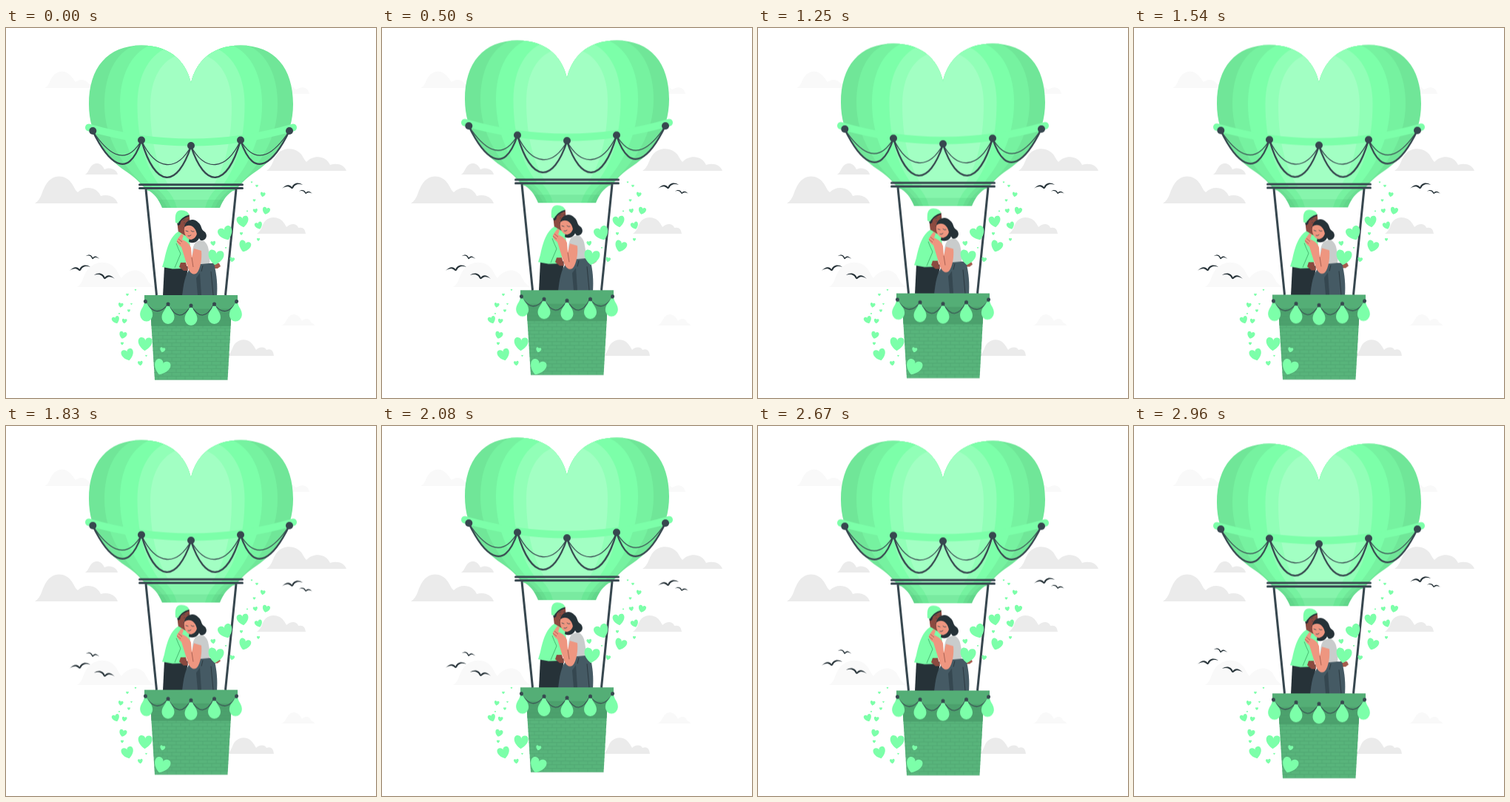
These frames come from a looping animation (500 by 500 pixels, 3 s). An HTML page without scripts:

```html
<!DOCTYPE html>
<html lang="en">
<head>
<meta charset="utf-8">
<title>Balloon ride</title>
<style>
  html, body { margin: 0; width: 100%; height: 100%; overflow: hidden; background: #fff; }
  svg { display: block; width: 100vw; height: 100vh; }
  .balloon { animation: bob 1.5s linear -33ms infinite; }
  .birds { animation: rise 3s infinite; fill: #263238; }
  @keyframes bob {
    0%, 100% { transform: translateY(.4px); }
    50% { transform: translateY(-9.6px); }
  }
  @keyframes rise {
    0% { transform: none; }
    50% { transform: none; animation-timing-function: ease-in; }
    100% { transform: translateY(-6.4px); }
  }
  .pale { fill: #f9f9f9; }
  .grey { fill: #ebebeb; }
  .main { fill: #7cffa9; }
  .ink { fill: #37474f; }
  .line { fill: none; stroke: #37474f; stroke-linecap: round; }
  .skin { fill: #ee9680; }
  .brown { fill: #8c4a40; }
  .night { fill: #263238; }
</style>
</head>
<body>
<svg viewBox="0 0 500 500">
  <defs>
    <path id="bird" d="M0 8C4 4 8 2 11.500 4.200C12.500 5 13 5.500 13.500 6C15 1.500 21-2 28 3C22 1 17.500 2.500 15.500 6.500C14.500 8.800 12.500 8.500 11.500 7C8 4 4 5.500 0 8Z"/>
    <path id="heart" d="M0 5C-6.600 1-6-4.700-2.800-4.700C-1-4.700 0-3.500 0-2.400C0-3.500 1-4.700 2.800-4.700C6-4.700 6.600 1 0 5Z"/>
    <g id="bulb">
      <path class="main" d="M-2.300-12.500H2.300C3-8 8.500-5 8.500 2.500A8.500 9 0 0 1-8.500 2.500C-8.500-5-3-8-2.300-12.500Z"/>
      <circle class="ink" cy="-15.500" r="2.500"/>
    </g>
    <path id="body" d="M250 75C245 50 226 23.500 183 23.500C137 23.500 112 54 112 103C112 147 136 176 161 193C171 200 179 206 184 213L192 220H308L316 213C321 206 329 200 339 193C364 176 388 147 388 103C388 54 363 23.500 317 23.500C274 23.500 255 50 250 75Z"/>
    <clipPath id="inBody"><use href="#body"/></clipPath>
    <path id="skirt" d="M190 218C201 224 206 231 211 243H289C294 231 299 224 310 218Z"/>
    <clipPath id="inSkirt"><use href="#skirt"/></clipPath>
    <pattern id="weave" width="12" height="10" patternUnits="userSpaceOnUse">
      <path d="M0 .5H12M0 5.500H12M2 .5V5.500M8 5.500V10" fill="none" stroke="#50a772" stroke-width=".8"/>
    </pattern>
    <g id="ropes" class="line">
      <path d="M117 139C137 180 164 209 183 152M183 152C202 217 231 217 250 160" stroke-width="2.300"/>
      <path d="M117 139C135 166 160 191 183 152M183 152C203 194 231 194 250 160" stroke-width="1.300"/>
      <path d="M189 218L203.500 361" stroke-width="3" stroke-linecap="butt"/>
      <path d="M188 369Q203 394 219 373Q234 402 250 375" stroke-width="1.100"/>
    </g>
  </defs>

  <g class="pale">
    <path d="M52 81C58 79 58 73 62 67C68 57 80 56 87 64C91 68 92 71 94 73C101 67 110 71 112 76C117 76 120 78 121 81Z"/>
    <path d="M370 89C377 87 377 80 384 79.500C389 79 390 83 393 83C400 78 408 80 410 89Z"/>
    <path d="M96 350C104 346 104 334 110 327C121 313 141 314 149 327C152 331 153 335 156 338C165 325 181 324 188 335C191 341 194 347 201 350Z"/>
    <path d="M372 402C379 400 379 391 385 388C392 385 397 390 400 396C405 391 411 393 412 398Q416 399 417 402Z"/>
  </g>
  <g class="grey">
    <path d="M39 237C48 232 48 220 55 210C64 197 80 198 88 209C92 214 93 219 97 222C107 212 123 215 128 227C138 224 148 228 151 237Z"/>
    <path d="M107 198C112 195 112 189 117 185C123 181 129 183 133 191C140 187 150 191 151 198Z"/>
    <path d="M352 193C360 188 360 179 366 171C375 160 392 161 400 172C402 176 404 179 406 181C416 170 433 173 438 185C448 182 457 185 460 193Z"/>
    <path d="M339 278C346 274 345 266 351 260C359 253 371 256 376 264L379 269C386 262 394 265 395 270Q404 268 405 278Z"/>
    <path d="M299 443C306 439 305 430 311 425C319 418 330 421 335 430L338 435C344 429 351 432 352 435Q361 432 362 443Z"/>
  </g>

  <g class="birds">
    <use href="#bird" x="86" y="320"/>
    <use href="#bird" transform="translate(147 331) scale(-1 1)"/>
    <use href="#bird" transform="translate(126 306) scale(-.65 .75)"/>
    <use href="#bird" x="373" y="209"/>
    <use href="#bird" transform="translate(414 218.500) scale(-.65 .68)"/>
  </g>

  <g class="balloon">
    <!-- Envelope -->
    <use href="#body" fill="#70e698"/>
    <g clip-path="url(#inBody)">
      <path fill="#76f2a0" d="M187 20C151 25 133 60 133 103C133 150 158 190 196 221H304C342 190 367 150 367 103C367 60 349 25 313 20Z"/>
      <path class="main" d="M204 20C171 28 154 62 154 103C154 152 175 191 203 221H297C325 191 346 152 346 103C346 62 329 28 296 20Z"/>
      <path fill="#91ffb7" d="M224 25C195 32 177.500 63 177.500 103C177.500 155 190 194 214 221H286C310 194 322.500 155 322.500 103C322.500 63 305 32 276 25Z"/>
      <path fill="#a2ffc3" d="M235 36C211 42 195 68 195 105C195 157 206 196 226 221H274C294 196 305 157 305 105C305 68 289 42 265 36Z"/>
    </g>
    <use href="#skirt" fill="#6ade92"/>
    <g clip-path="url(#inSkirt)">
      <path fill="#70e698" d="M197 218Q211 228 218 243H282Q289 228 303 218Z"/>
      <path fill="#76f2a0" d="M205 218Q217 228 223 243H277Q283 228 295 218Z"/>
      <path fill="#86f5ac" d="M217 218Q227 228 231 243H269Q273 228 283 218Z"/>
      <path d="M190 232H310V243H190Z" fill="#2ea85c" opacity=".15"/>
    </g>
    <path d="M112 134.500C155 147 200 154.500 250 154.500S345 147 388 134.500" fill="none" stroke="#7cffa9" stroke-width="10" stroke-linecap="round"/>

    <!-- Couple -->
    <path fill="#a55b4d" d="M279 316L288 318L290 322L286 325L279 325Z"/>
    <path class="night" d="M214 322L212 362H241L246 322Z"/>
    <path class="brown" d="M232 259C231 267 233 272 233 279L246 284L246 276C249 272 249 262 247.500 252L240 252Z"/>
    <path class="night" d="M231 262Q237 254 247 252L247.500 254.500Q240 257 236.500 261L235 266L232 267Z"/>
    <path class="main" d="M229 263C228 251 230 246.500 237 246.300C243 246.500 246.500 249 247.500 252.500C241 254 236 258 232.500 264Z"/>
    <path class="line" d="M239 260L242 259M245 259L247 259.500M241 263V264M246 263V264M240 270Q242 272 244 270" stroke-width=".8"/>
    <path class="main" d="M233 275C225 280 219 289 214 313L211 323L225 325.500L241 325L249 298L248 283Q240 280 233 275Z"/>
    <path class="brown" d="M236 317L243 317L246 328L240 328L234 323Z"/>
    <path d="M230 291Q233 299 236 305M236 305L228 324" fill="none" stroke="#39a763" stroke-width=".8"/>
    <path fill="#455a64" d="M262 318L281 318C285 334 286 348 285 362H238C240 345 242 334 248 326Z"/>
    <path d="M257 338L262 331L264 361H259Z" fill="#354750"/>
    <path d="M277 329L280 361M266 321L264 329" fill="none" stroke="#263238" stroke-width=".8"/>
    <path class="night" d="M242 268C243 260 253 255 260 263C265 267 263 272 268 275C273 279 271 286 266 287C263 288 262 286 261 284C259 289 253 292 247 289L249 276Z"/>
    <path class="skin" d="M241.500 268C247 264 255 265 258 271C260 278 256 285 250 286C244 286 239 277 241.500 268Z"/>
    <path class="night" d="M241 269C242 261 249 258 256 262C261 265 262 273 263 281L258 279C257 273 254 268 249 267Q245 266 241 269Z"/>
    <path class="line" d="M243 274L246 275M250 274Q252 276 254 275M246 281Q248 282 250 280" stroke-width=".8"/>
    <path fill="#c9cccc" d="M256 290C264 284 270 287 273 296C275 305 276 313 275 318L253 320C251 308 251 296 256 290Z"/>
    <path class="skin" d="M254 298L264 301C265 311 263 325 258 331C253 335 249 331 246 325L237 296C232 292 229 288 232 285L237 278L240 280L238 286C243 288 248 291 250 297L251 310Z"/>
    <path d="M231 288L236 292M233 285L238 289M251 310L253 323" fill="none" stroke="#8f4c42" stroke-width=".7"/>

    <!-- Basket -->
    <path fill="#58b47b" d="M195 379H305L299.500 475.500H201Z"/>
    <path fill="url(#weave)" d="M195 379H305L299.500 475.500H201Z"/>
    <path fill="#4b9e6b" opacity=".85" d="M195 379H305L303.500 403H196.500Z"/>
    <path fill="#54ae76" d="M187 361H313V379.500H187Z"/>

    <!-- Rigging -->
    <use href="#ropes"/>
    <use href="#ropes" transform="translate(500) scale(-1 1)"/>
    <path class="line" stroke-width="3" stroke-linecap="butt" d="M180.500 211.800H319.500M180.500 216.600H319.500"/>
    <g class="ink">
      <circle cx="117.300" cy="139" r="5"/>
      <circle cx="183" cy="151.500" r="5"/>
      <circle cx="250" cy="159" r="5"/>
      <circle cx="317" cy="151.500" r="5"/>
      <circle cx="383" cy="139" r="5"/>
    </g>
    <use href="#bulb" transform="translate(189.500 385) rotate(-4)"/>
    <use href="#bulb" x="219" y="388.500"/>
    <use href="#bulb" x="250" y="390.500"/>
    <use href="#bulb" x="281.500" y="388.500"/>
    <use href="#bulb" transform="translate(310.500 385) rotate(4)"/>
  </g>

  <g class="main">
    <use href="#heart" transform="translate(320 261.500) rotate(-8) scale(1.550)"/>
    <use href="#heart" transform="translate(322.500 295) rotate(18) scale(1.550)"/>
    <use href="#heart" transform="translate(297 277.500) rotate(-22) scale(1.900)"/>
    <use href="#heart" transform="translate(283.500 310) rotate(8) scale(2.050)"/>
    <use href="#heart" transform="translate(351.500 247) rotate(15) scale(1)"/>
    <use href="#heart" transform="translate(341.500 267) rotate(-20) scale(1)"/>
    <use href="#heart" transform="translate(337 247) rotate(-10) scale(.6)"/>
    <use href="#heart" transform="translate(347 225) rotate(12) scale(.65)"/>
    <use href="#heart" transform="translate(339 213.500) scale(.35)"/>
    <use href="#heart" transform="translate(332 208.500) scale(.25)"/>
    <use href="#heart" transform="translate(335.500 233) scale(.35)"/>
    <use href="#heart" transform="translate(326 247.500) scale(.22)"/>
    <use href="#heart" transform="translate(318 278) scale(.4)"/>
    <use href="#heart" transform="translate(341 286) scale(.4)"/>
    <use href="#heart" transform="translate(280 291) rotate(-10) scale(.65)"/>
    <use href="#heart" transform="translate(305.500 313) rotate(12) scale(.65)"/>
    <use href="#heart" transform="translate(297 297) scale(.22)"/>

    <use href="#heart" transform="translate(188 427) rotate(3) scale(1.850)"/>
    <use href="#heart" transform="translate(164.500 441.500) rotate(-15) scale(1.600)"/>
    <use href="#heart" transform="translate(210.500 458.500) rotate(20) scale(2.100)"/>
    <use href="#heart" transform="translate(158 415) rotate(15) scale(1)"/>
    <use href="#heart" transform="translate(148.500 394.500) rotate(-20) scale(1)"/>
    <use href="#heart" transform="translate(160 396) rotate(10) scale(.65)"/>
    <use href="#heart" transform="translate(155 374.500) rotate(12) scale(.65)"/>
    <use href="#heart" transform="translate(211.500 435) rotate(15) scale(.68)"/>
    <use href="#heart" transform="translate(181.500 453) rotate(-8) scale(.65)"/>
    <use href="#heart" transform="translate(157 426.500) scale(.4)"/>
    <use href="#heart" transform="translate(164 360.500) scale(.35)"/>
    <use href="#heart" transform="translate(175 354) scale(.25)"/>
    <use href="#heart" transform="translate(166 382) scale(.38)"/>
    <use href="#heart" transform="translate(153 386) scale(.22)"/>
    <use href="#heart" transform="translate(189.500 443) scale(.25)"/>
    <use href="#heart" transform="translate(169.500 373) scale(.25)"/>
  </g>
</svg>
</body>
</html>
```
